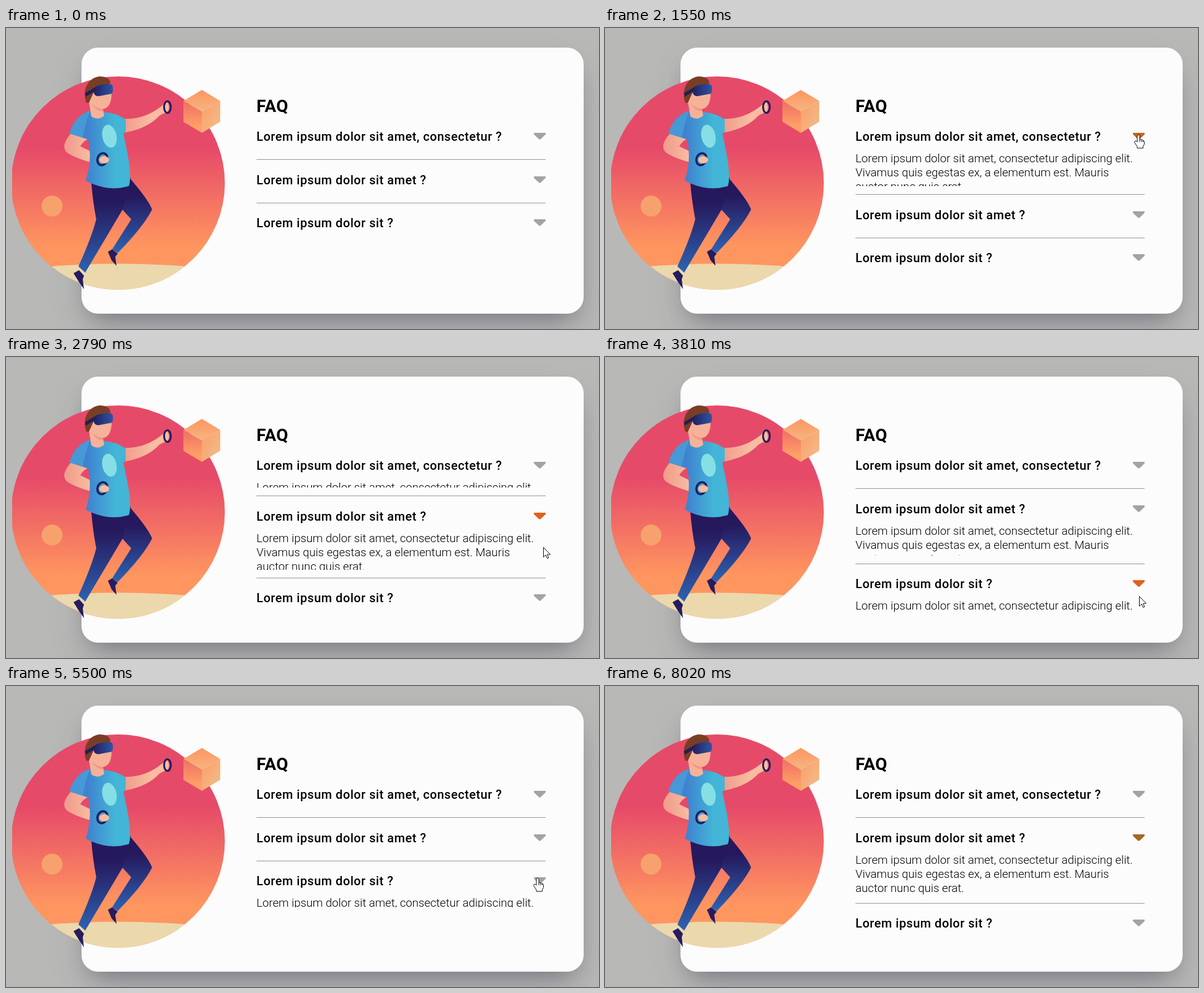
An HTML page for the animation above (8420 ms loop, 966x491 px).

```html
<!DOCTYPE html>
<html lang="en">
<head>
<meta charset="utf-8">
<title>FAQ</title>
<style>
html, body { margin: 0; width: 100%; height: 100%; overflow: hidden; background: #b8b8b6; }
.card {
  position: absolute; left: 123px; top: 32px; width: 818px; height: 434px;
  border-radius: 27px; background: #fcfcfc;
  box-shadow: 0 30px 60px -12px rgba(50,50,93,.25), 0 18px 36px -18px rgba(0,0,0,.3);
}
svg { position: absolute; left: 0; top: 0; }
text { font-family: Roboto, Arial, sans-serif; fill: #000; }
.title { font-size: 28px; font-weight: 700; letter-spacing: .5px; }
.question { font-size: 20px; font-weight: 500; letter-spacing: .56px; }
.answer { font-size: 18.7px; font-weight: 300; }
</style>
</head>
<body>
<div class="card"></div>
<svg width="966" height="491">
  <defs id="defs"></defs>

  <g clip-path="url(#edge)">
    <circle cx="182.5" cy="253" r="174" fill="url(#sky)"/>
    <path clip-path="url(#disc)" fill="#ecd8ad" d="M60 390Q183 379 306 390V430H60z"/>
  </g>
  <circle cx="75" cy="290.5" r="17" fill="#f7a26d"/>

  <path fill="url(#cubeTop)" d="M319 101l30 18-30 17-30-17z"/>
  <path fill="url(#cubeLeft)" d="M289 119l30 17v35l-30-18z"/>
  <path fill="url(#cubeRight)" d="M349 119l-30 17v35l30-18z"/>

  <!-- legs and shoes -->
  <path fill="url(#pants)" d="M200 243Q232 280 238 296 224 324 182 367L173 361 204 312 184 290z"/>
  <path fill="url(#pants)" d="M139 252Q141 280 147 312 140 340 118 389L129 399 190 296 203 244z"/>
  <path fill="#261c60" d="M110 400l9-5 8 9-2 6 2 16-9-13zM166 365l7-4 9 7-4 5 2 15-8-9z"/>

  <!-- arms -->
  <path fill="url(#skin)" d="M192 148Q225 150 254 127L262 120Q269 130 262 138 251 140 246 147 225 166 190 171z"/>
  <ellipse cx="263" cy="129" rx="5.5" ry="9.5" fill="none" stroke="#211d5c" stroke-width="3"/>
  <path fill="url(#skin)" d="M106 172Q88 192 99 203 115 214 150 222H160Q170 214 160 207L148 206 121 193Q125 185 135 180z"/>

  <!-- torso -->
  <path fill="url(#shirt)" d="M137 135Q113 142 103 172L134 182Q141 215 130 249 165 268 200 258 207 240 191 172L195 171V149Q178 138 160 137z"/>
  <path fill="#55bfdf" opacity=".35" d="M103 172L125 179Q128 160 137 135 113 142 103 172z"/>
  <ellipse cx="168.5" cy="176.5" rx="11.5" ry="19" fill="#86dfe5" transform="rotate(-12 168.5 176.5)"/>
  <ellipse cx="157" cy="214" rx="8" ry="10" fill="none" stroke="#211d5c" stroke-width="3.5" transform="rotate(20 157 214)"/>
  <ellipse cx="160" cy="215" rx="8" ry="6" fill="#f8bca0"/>

  <!-- head -->
  <path fill="#f6b299" d="M136 106H172Q172 130 158 132L160 143Q150 152 139 144L135 120z"/>
  <path fill="#ee978a" d="M140 124Q148 131 158 132V136Q146 135 140 124z"/>
  <path fill="#783e25" d="M131 122C124 104 131 82 152 79Q170 79 170 91L146 98 135 122z"/>
  <path fill="#211d5c" d="M129 106L148 95V101L130 112z"/>
  <path fill="url(#visor)" d="M147 95Q160 90 172 92 175 94 174 104 173 108 168 108L152 111Q144 112 143 105z"/>

  <text class="title" x="408" y="137">FAQ</text>
  <g id="list"></g>
  <g id="cursor" fill="#fff" stroke="#111" stroke-linejoin="round">
    <path id="pointer" d="M.5.5v16l3.700-3.500 2.500 5.500 2.300-1-2.400-5.500h5z"/>
    <path id="hand" d="M-2 12V1.500q2-3 4 0V8q2-1 3 .5 2-.5 2.500 1 2 0 2 2v4l-2 4V22H-2v-2.500l-4.500-7q0-3 3-2zM2 8v4M5 8.500V12M7.500 9.500V12"/>
  </g>
</svg>
<script>
const LOOP = 8420, SLIDE = 300, MAX_HEIGHT = 75, FULL = 69, PITCH = 70.5;
const GREY = '#a3a3a3', ORANGE = '#e0601f';
const $ = id => document.getElementById(id);

const questions = [
  'Lorem ipsum dolor sit amet, consectetur ?',
  'Lorem ipsum dolor sit amet ?',
  'Lorem ipsum dolor sit ?'
];
const answer = [
  'Lorem ipsum dolor sit amet, consectetur adipiscing elit.',
  'Vivamus quis egestas ex, a elementum est. Mauris',
  'auctor nunc quis erat.'
];

// time, item, arrow colour
const clicks = [
  [1412, 0, '#c8621d'], [2630, 1], [3750, 2], [5365, 2], [6010, 2], [6500, 2], [7210, 1, '#a5691f']
];

// cursor rests: arrival time, x, y
const SHOWN = 330, HIDDEN = 8010;
const rests = [
  [SHOWN, 913, 466], [1080, 859, 160], [1400, 869, 174], [2100, 870, 312], [2780, 875, 310],
  [3340, 870, 390], [4400, 862, 255], [4950, 866, 313], [6900, 868, 256], [8180, 895, 412]
];

// name, direction, from, to, offsets
const gradient = (id, x, y, from, to, a = 0, b = 1) => `
  <linearGradient id="${id}" x2="${x}" y2="${y}">
    <stop offset="${a}" stop-color="${from}"/><stop offset="${b}" stop-color="${to}"/>
  </linearGradient>`;

$('defs').innerHTML =
  gradient('sky', 0, 1, '#e64a69', '#ff965f', .34, .8) +
  gradient('shirt', 1, 0, '#3f83d0', '#43b5d7', .3, .75) +
  gradient('pants', 0, 1, '#26185c', '#2d62b2', .25) +
  gradient('visor', 1, 0, '#221f62', '#2d56a3') +
  gradient('skin', 1, 0, '#f09a8b', '#f8bca0', 0, .6) +
  gradient('cubeTop', 0, 1, '#ff955f', '#f4b683') +
  gradient('cubeLeft', 0, 1, '#ef6f62', '#ffa067', 0, .8) +
  gradient('cubeRight', 1, 1, '#fd9d65', '#efc08f') + `
  <clipPath id="disc"><circle cx="182.5" cy="253" r="174"/></clipPath>
  <clipPath id="edge"><rect x="10" width="400" height="491"/></clipPath>`;

$('list').innerHTML = questions.map((question, i) => `
  <g id="item${i}">
    <text class="question" x="408" y="184">${question}</text>
    <path id="arrow${i}" d="M860 171h19v2.500l-7.500 7.300q-2 1.700-4 0l-7.500-7.300z"/>
    <clipPath id="panel${i}"><rect id="clip${i}" x="400" y="201" width="490"/></clipPath>
    <g clip-path="url(#panel${i})">
      ${answer.map((line, n) => `<text class="answer" x="408" y="${219 + 23 * n}">${line}</text>`).join('')}
    </g>
    <rect id="rule${i}" x="408" width="471" height="${i < 2 ? 1 : 0}" fill="#999"/>
  </g>`).join('');

const bezier = (a, b, u) => 3 * a * u * (1 - u) ** 2 + 3 * b * u * u * (1 - u) + u ** 3;

// the CSS "ease" curve
function ease(x) {
  if (x >= 1) return 1;
  let lo = 0, hi = 1;
  for (let i = 0; i < 20; i++) {
    const mid = (lo + hi) / 2;
    if (bezier(.25, .25, mid) < x) lo = mid; else hi = mid;
  }
  return bezier(.1, 1, lo);
}

// a click toggles its item and closes the others
function itemState(i, t) {
  let state = { open: false, since: -LOOP };
  for (const [time, target, colour = ORANGE] of clicks) {
    const open = target === i && !state.open;
    if (time <= t && open !== state.open) state = { open, since: time, colour };
  }
  return state;
}

function drawItems(t) {
  let shift = 0;
  return questions.map((_, i) => {
    const { open, since, colour } = itemState(i, t);
    const p = ease((t - since) / SLIDE);
    const height = Math.round(Math.min(FULL, MAX_HEIGHT * (open ? p : 1 - p)));
    const top = Math.round(PITCH * i) + shift;
    $('item' + i).setAttribute('transform', `translate(0 ${top})`);
    $('arrow' + i).setAttribute('fill', open ? colour : GREY);
    $('clip' + i).setAttribute('height', height);
    $('rule' + i).setAttribute('y', 214 + height);
    shift += height;
    return top;
  });
}

function drawCursor(t, tops) {
  const shown = t >= SHOWN && t < HIDDEN;
  $('cursor').style.display = shown ? '' : 'none';
  if (!shown) return;
  const n = rests.findIndex(r => r[0] > t);
  const [, x0, y0] = rests[n - 1], [arrival, x1, y1] = rests[n];
  const travel = 2.4 * Math.hypot(x1 - x0, y1 - y0);
  const u = Math.max(0, 1 - (arrival - t) / travel), k = u * u * (3 - 2 * u);
  const x = Math.round(x0 + (x1 - x0) * k), y = Math.round(y0 + (y1 - y0) * k);
  const onQuestion = x < 880 && tops.some(top => y >= top + 160 && y < top + 190);
  $('cursor').setAttribute('transform', `translate(${x} ${y})`);
  $('hand').style.display = onQuestion ? '' : 'none';
  $('pointer').style.display = onQuestion ? 'none' : '';
}

function frame() {
  const t = performance.now() % LOOP;
  drawCursor(t, drawItems(t));
  requestAnimationFrame(frame);
}
frame();
</script>
</body>
</html>
```
